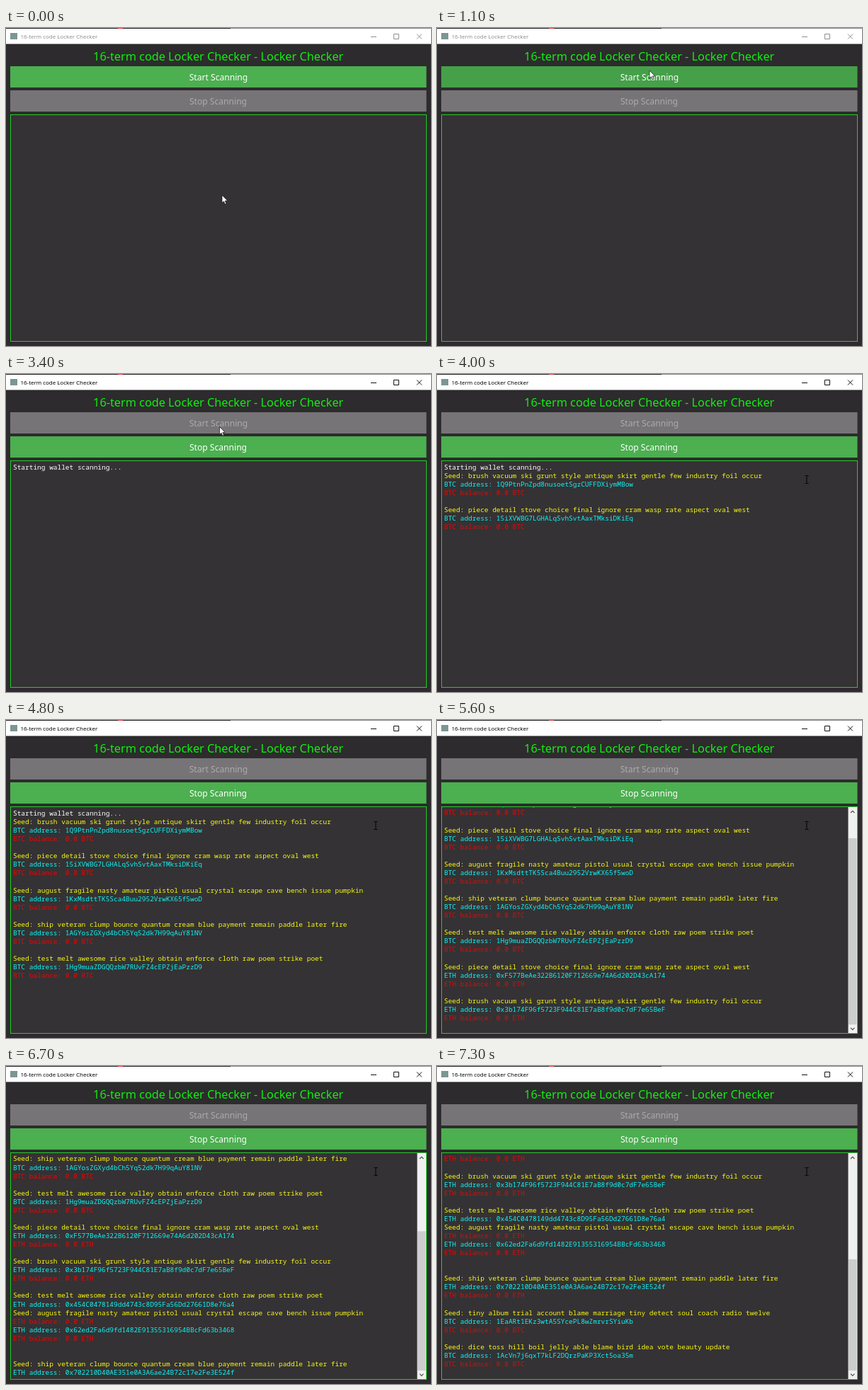
Recreate the animation shown at these times as an HTML page. Size 600 px wide and 449 px high, loop 8 s.

```html
<!DOCTYPE html>
<html lang="en">
<head>
<meta charset="utf-8">
<style>
  html, body { margin: 0; width: 100%; height: 100%; overflow: hidden; background: #2d2b2d; }
  svg { display: block; width: 600px; height: 449px; }
  text { font-family: "Noto Sans", "Open Sans", sans-serif; }
  .caption { font-size: 7.95px; }
  .heading { font-size: 16.25px; fill: #0ff00f; text-anchor: middle; }
  .button { font-size: 12.1px; text-anchor: middle; }
  #log text { font-family: "Noto Sans Mono", "DejaVu Sans Mono", monospace; font-size: 9.48px; }
</style>
</head>
<body>
<svg viewBox="0 0 600 449">
  <rect width="600" height="449" fill="#2d2b2d"/>
  <rect width="600" height="22.5" fill="#fff"/>
  <rect width="600" height="1" fill="#242224"/>
  <rect x="158" width="7" height="1" fill="#d8404c"/>
  <rect x="317" width="283" height="1" fill="#8c8a8c"/>
  <rect x="6" y="7" width="10" height="9" fill="#7d9693"/>
  <text id="caption" class="caption" x="20.5" y="15">16-term code Locker Checker</text>
  <path id="controls" d="M515 12.5h8M547.5 8.5h7v7h-7zM580 8.5l7 7m0-7l-7 7" fill="none" stroke-width="1"/>
  <text class="heading" x="299.7" y="46">16-term code Locker Checker - Locker Checker</text>

  <rect id="startBox" x="6" y="54" width="587.5" height="30"/>
  <text id="startLabel" class="button" x="300" y="74">Start Scanning</text>
  <rect id="stopBox" x="6" y="88" width="587.5" height="30"/>
  <text id="stopLabel" class="button" x="299.5" y="108">Stop Scanning</text>

  <clipPath id="view"><rect x="7" y="123" width="586" height="319"/></clipPath>
  <rect x="6.5" y="122.5" width="587" height="320" fill="#343234" stroke="#1fd024"/>
  <g clip-path="url(#view)">
    <g id="log"></g>
    <g id="bar">
      <rect x="580.5" y="123" width="12.5" height="319" fill="#f0f0f0"/>
      <rect id="thumb" x="581" width="11.5" fill="#cdcdcd"/>
      <path d="M584 131l2.7-2.7 2.7 2.7M584 434.7l2.7 2.7 2.7-2.7" fill="none" stroke="#505050" stroke-width="1.2"/>
    </g>
  </g>

  <path id="arrow" d="M0 0V11L2.5 8.7 4.2 12.7 6 11.9 4.3 8H7.8Z" fill="#fff" stroke="#111" stroke-width=".7"/>
  <path id="beam" d="M-2.5 -5.5h2l.5 .5 .5-.5h2M0 -5V5M-2.5 5.5h2l.5-.5 .5 .5h2" fill="none" stroke="#000"/>
</svg>
<script>
const LOOP = 8000, PITCH = 12.06, TEXT_SPAN = 301;
const $ = id => document.getElementById(id);
const set = (el, attrs) => { for (const k in attrs) el.setAttribute(k, attrs[k]); };
const show = (el, on) => set(el, { visibility: on ? 'visible' : 'hidden' });

const seeds = {
  brush: 'brush vacuum ski grunt style antique skirt gentle few industry foil occur',
  piece: 'piece detail stove choice final ignore cram wasp rate aspect oval west',
  august: 'august fragile nasty amateur pistol usual crystal escape cave bench issue pumpkin',
  ship: 'ship veteran clump bounce quantum cream blue payment remain paddle later fire',
  test: 'test melt awesome rice valley obtain enforce cloth raw poem strike poet',
  tiny: 'tiny album trial account blame marriage tiny detect soul coach radio twelve',
  dice: 'dice toss hill boil jelly able blame bird idea vote beauty update'
};
const entry = (coin, seed, address) => [
  `Seed: ${seeds[seed]}`, `${coin} address: ${address}`, `${coin} balance: 0.0 ${coin}`, ''
];
const btc = (seed, address) => entry('BTC', seed, address);
const eth = (seed, address) => entry('ETH', seed, address);

// Two workers wrote at once here, so their lines interleave.
const a = eth('test', '0x454C0478149dd4743c8D95Fa56Dd27661D8e76a4');
const b = eth('august', '0x62ed2Fa6d9fd1482E91355316954BBcFd63b3468');

const lines = [
  'Starting wallet scanning...',
  ...btc('brush', '1Q9PtnPnZpd8nusoetSgzCUFFDXiymMBow'),
  ...btc('piece', '15iXVWBG7LGHALqSvhSvtAaxTMksiDKiEq'),
  ...btc('august', '1KxMsdttTK5Sca4Buu2952VrwKX65f5woD'),
  ...btc('ship', '1AGYosZGXyd4bCh5Yq52dk7H99qAuY81NV'),
  ...btc('test', '1Hg9muaZDGQQzbW7RUvFZ4cEPZjEaPzzD9'),
  ...eth('piece', '0xF577BeAe322B6120F712669e74A6d202D43cA174'),
  ...eth('brush', '0x3b174F96f5723F944C81E7aB8f9d0c7dF7e65BeF'),
  a[0], a[1], b[0], a[2], b[1], b[2], '', '',
  ...eth('ship', '0x702210D40AE351e0A3A6ae24B72c17e2Fe3E524f'),
  ...btc('tiny', '1EaARt1EKz3wtA5SYcePL8wZmrvrSYiuKb'),
  ...btc('dice', '1AcVn7j6qxT7kLF2DQrzPaKP3Xct5oa35m')
];

const colorOf = line =>
  line.startsWith('Seed') ? '#f8f814' :
  line.includes('address') ? '#0ff4f4' :
  line.includes('balance') ? '#ec0404' : '#fff';

const rows = lines.map((line, i) => {
  const row = document.createElementNS('http://www.w3.org/2000/svg', 'text');
  set(row, { x: 10, y: 135 + i * PITCH, fill: colorOf(line) });
  row.textContent = line;
  return $('log').appendChild(row);
});

// [time, number of lines written]
const writes = [
  [0, 0], [1600, 1], [3700, 5], [3900, 9], [4600, 13], [4700, 17], [4800, 21],
  [5000, 22], [5100, 25], [5400, 26], [5500, 27], [5600, 29], [6400, 31],
  [6500, 37], [6700, 39], [6800, 41], [7200, 45], [7300, 49]
];
// [time, x, y] of the pointer
const moves = [
  [0, 305, 236], [500, 304.6, 236.5], [600, 305, 236],
  [800, 305, 228], [900, 304, 180], [1000, 302, 112], [1100, 300, 60],
  [1200, 298, 44], [1300, 296.5, 68.5],
  [3400, 301.5, 74.5], [3500, 336, 92], [3600, 400, 116], [3700, 462, 135],
  [3800, 500, 145], [3900, 517, 148], [4000, 522, 149]
];
const at = (steps, t) => steps.findLast(step => step[0] <= t);

function paintButton(name, top, enabled, pointerY) {
  const hover = pointerY >= top && pointerY < top + 30;
  set($(name + 'Box'), { fill: !enabled ? '#767476' : hover ? '#45a049' : '#4caf50' });
  set($(name + 'Label'), { fill: enabled ? '#fff' : '#adabad' });
}

function render(t) {
  const active = t >= 1500, scanning = t >= 1600;
  const [, x, y] = at(moves, t);
  const count = at(writes, t)[1];

  set($('caption'), { fill: active ? '#000' : '#8f8f8f' });
  set($('controls'), { stroke: active ? '#111' : '#8f8f8f' });
  paintButton('start', 54, !scanning, y);
  paintButton('stop', 88, scanning, y);

  const scroll = Math.max(0, (count - 1) * PITCH - TEXT_SPAN);
  rows.forEach((row, i) => show(row, i < count));
  set($('log'), { transform: `translate(0 ${-scroll})` });

  const thumb = 294 * 320 / (count * PITCH + 8);
  show($('bar'), scroll > 0);
  set($('thumb'), { y: 430 - thumb, height: thumb });

  const overText = scanning && y > 122;
  show($('arrow'), !overText);
  show($('beam'), overText);
  set($(overText ? 'beam' : 'arrow'), { transform: `translate(${x} ${y})` });
}

const began = performance.now();
function tick() {
  render((performance.now() - began) % LOOP);
  requestAnimationFrame(tick);
}
tick();
</script>
</body>
</html>
```
